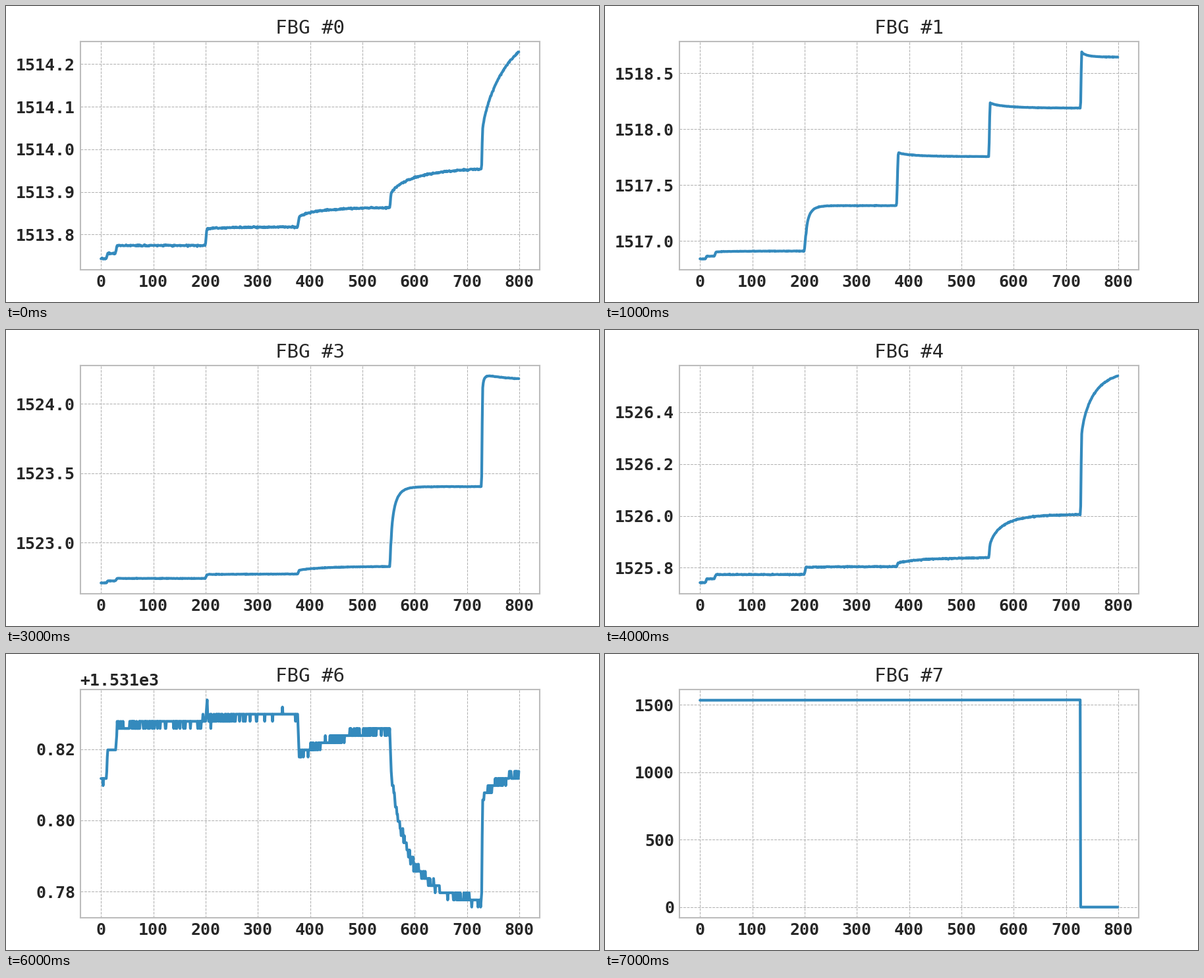
Write a matplotlib script that moves like this. It is 900 by 450 pixels and loops after 8 s.

```python
import numpy as np
import matplotlib.pyplot as plt
from matplotlib.animation import FuncAnimation

INK = "#262626"
plt.rcParams.update({
    "font.family": "DejaVu Sans Mono",
    "font.weight": "bold",
    "text.color": INK,
    "axes.edgecolor": "#bcbcbc",
    "axes.linewidth": 1,
    "axes.titlesize": 14,
    "axes.titleweight": "normal",
    "axes.grid": True,
    "axes.axisbelow": True,
    "grid.color": "#b2b2b2",
    "grid.linestyle": "--",
    "grid.linewidth": 0.5,
    "lines.solid_capstyle": "round",
})

X = np.arange(800)
STARTS = 10, 27, 199, 375.5, 552, 727.5   # when each load is applied
RISES = 3, 4, 4, 4, 3, 2.5                # samples each load takes
rng = np.random.default_rng(4)


def jump(start, rise):
    t = np.clip((X - start) / rise, 0, 1)
    return t * t * (3 - 2 * t)


def creep(start, tau):
    """Stretched exponential relaxation."""
    return 1 - np.exp(-(np.maximum(X - start, 0) / tau) ** 0.8)


def response(*loads):
    """Sum the loads, each a step followed by (amount, tau) relaxations."""
    y = np.zeros(X.size)
    for start, rise, (step, *slow) in zip(STARTS, RISES, loads):
        y += step * jump(start, rise)
        for amount, tau in slow:
            y += amount * creep(start + rise, tau)
    return y


def fit(y, low, high):
    return low + (y - y.min()) / np.ptp(y) * (high - low)


def sensor(low, high, *loads):
    return fit(response(*loads) + rng.normal(0, 0.0008, X.size), low, high)


def coarse_sensor(low, high, *loads):
    """Loads are counted in units of the sensor's resolution."""
    return fit(np.round(response(*loads) + rng.normal(0, 0.3, X.size)), low, high)


CHARTS = [
    sensor(1513.7423, 1514.2289, (.012,), (.0185,), (.0395, (.005, 80)),
           (.0245, (.021, 40)), (.034, (.06, 50)), (.095, (.265, 60))),
    sensor(1516.8395, 1518.6895, (.024,), (.038, (.008, 30)), (.16, (.245, 6)),
           (.473, (-.036, 30)), (.479, (-.047, 30)), (.501, (-.046, 10))),
    sensor(1520.0226, 1521.8226, (.023,), (.032,), (.08, (.02, 80)),
           (.36, (.08, 15)), (.44, (.1, 15)), (.65, (-.03, 40))),
    sensor(1522.7074, 1524.2004, (.0145,), (.018,), (.028, (.0045, 80)),
           (.027, (.029, 50)), (.2, (.377, 7)), (.715, (.1, 2.5), (-.065, 100))),
    sensor(1525.741, 1526.539, (.014,), (.016,), (.027, (.003, 80)),
           (.013, (.021, 50)), (.05, (.11, 25)), (.3, (.24, 25))),
    sensor(1528.7713, 1529.017, (.0117,), (.0165, (.002, 80)),
           (.0225, (.001, 50)), (.006, (-.0045, 4), (.005, 100)),
           (-.0137, (.008, 5), (.045, 65)), (.035, (.03, 2), (.11, 40))),
    coarse_sensor(1531.77563, 1531.83389, (4,), (3, (1, 60)),
                  (3, (-2.8, 1), (1.3, 150)), (-6, (4.5, 100)),
                  (-5.7, (-20, 40)), (14, (5.5, 40))),
    np.where(X < 728, 1535 + X / 260, 0),
]

fig, ax = plt.subplots(figsize=(6, 3), dpi=150)
line, = ax.plot(X, CHARTS[0], color="#348ABD", lw=2)
ax.tick_params(length=0, pad=3.5, labelsize=12, labelcolor=INK)
ax.yaxis.offsetText.set(size=12, color=INK)


def draw(i):
    line.set_ydata(CHARTS[i])
    ax.relim()
    ax.autoscale_view()
    ax.set_title(f"FBG #{i}")
    return line,


anim = FuncAnimation(fig, draw, frames=len(CHARTS), interval=1000, repeat=True)
plt.show()
```
